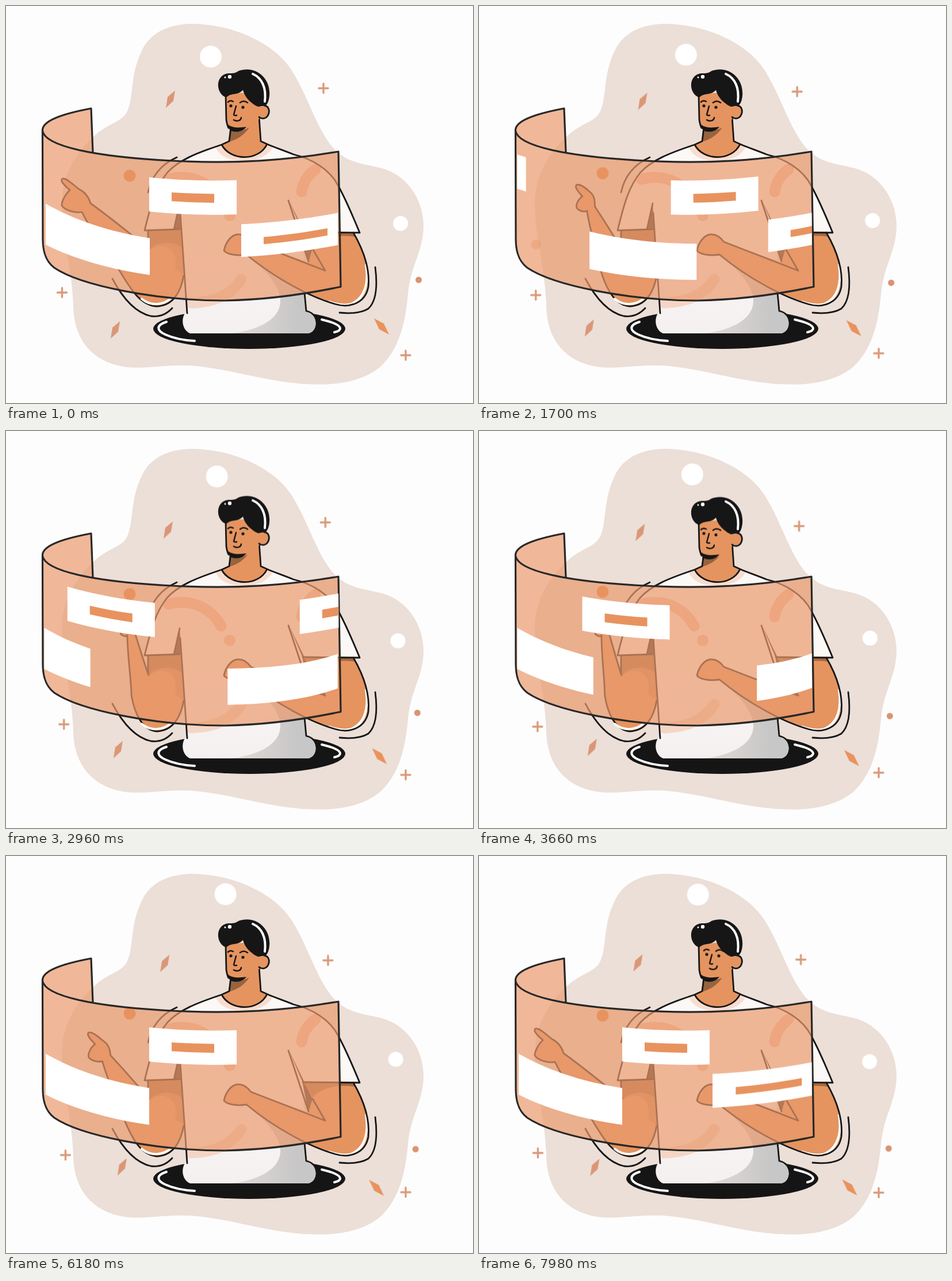
Animation, 812 px wide and 690 px high, one loop 8000 ms. Source, as an HTML page without scripts:

```html
<!DOCTYPE html>
<html lang="en">
<head>
<meta charset="utf-8">
<title>Curved screen</title>
<style>
html, body { margin: 0; width: 100%; height: 100%; overflow: hidden; background: #fdfdfd; }
svg { display: block; width: 100vw; height: 100vh; }
.ln { fill: none; stroke: #161616; stroke-width: 2.8; stroke-linecap: round; stroke-linejoin: round; }
.fine { stroke-width: 2.5; }
.edge { fill: none; stroke: #282828; stroke-width: 3.2; stroke-linejoin: round; }
.shine { fill: none; stroke: #fff; stroke-width: 4; stroke-linecap: round; }
.tint { fill: none; stroke: #f6c3a9; stroke-width: 19; stroke-linecap: round; }
.skin { fill: #e5945f; }
.shade { fill: #a8683a; }
.plus { fill: none; stroke: #da9a7b; stroke-width: 3.4; stroke-linecap: round; }

/* floating bits: --x and --y give the travel */
.slow, .fast { animation: slow 8s infinite; }
.fast { animation-name: fast; }
@keyframes slow {
  0% { transform: none; animation-timing-function: cubic-bezier(.37, 0, .63, 1); }
  84% { transform: translate(var(--x), var(--y)); animation-timing-function: ease-in; }
  100% { transform: translate(calc(var(--x) * .95), calc(var(--y) * .95)); }
}
@keyframes fast {
  0% { transform: none; animation-timing-function: cubic-bezier(.37, 0, .63, 1); }
  71% { transform: translate(var(--x), var(--y)); animation-timing-function: cubic-bezier(.4, 0, .8, .8); }
  100% { transform: translate(calc(var(--x) * .82), calc(var(--y) * .82)); }
}

/* windows sliding along the curved bands */
.slide { animation: slide 8s infinite; }
@keyframes slide {
  0% { transform: none; animation-timing-function: cubic-bezier(.45, 0, .39, 1); }
  72%, 100% { transform: translateX(404px); }
}
.away { animation: away 8s infinite; }
@keyframes away {
  0% { transform: none; animation-timing-function: cubic-bezier(.42, 0, .39, 1); }
  72% { transform: translateX(404px); animation-timing-function: step-end; }
  72.1%, 100% { transform: none; }
}
.leave { animation: leave 8s infinite; transform-box: fill-box; transform-origin: 0 0; }
@keyframes leave {
  0% { transform: translateX(0) scaleX(1); animation-timing-function: cubic-bezier(.33, 0, .67, .4); }
  13.75% { transform: translateX(56px) scaleX(1.01); animation-timing-function: cubic-bezier(.33, .24, .67, .6); }
  29.5% { transform: translateX(217px) scaleX(1.055); animation-timing-function: cubic-bezier(.33, .34, .67, .78); }
  45.75% { transform: translateX(414px) scaleX(1.06); animation-timing-function: ease-out; }
  58%, 100% { transform: translateX(530px) scaleX(1.06); }
}
.enter { animation: enter 8s infinite; }
@keyframes enter {
  0% { transform: translateX(-295px); animation-timing-function: cubic-bezier(.44, 0, .39, 1); }
  72%, 100% { transform: none; }
}
.pop { transform-origin: 493px 398px; animation: pop 8s infinite; }
@keyframes pop {
  0%, 71.9% { transform: none; }
  72%, 90% { transform: scale(0); animation-timing-function: cubic-bezier(.2, .6, .4, 1); }
  100% { transform: scale(1.035); }
}

.head { animation: nod 8s infinite ease-in-out; }
@keyframes nod {
  0%, 31%, 57%, 100% { transform: none; }
  42%, 47% { transform: translateY(4.5px); }
}
.face { animation: look 8s infinite ease-in-out; }
@keyframes look {
  0%, 86% { transform: none; }
  96%, 100% { transform: translate(5px, -2.5px); }
}
</style>
</head>
<body>
<svg viewBox="0 0 812 690" preserveAspectRatio="none">
<defs>
  <path id="gem" d="M8-15L5 3L-8 15L-5-4Z"/>
  <path id="plus" class="plus" d="M-8 0H8M0-8V8"/>
  <linearGradient id="fold" gradientUnits="userSpaceOnUse" x1="385" y1="0" x2="505" y2="0">
    <stop offset="0" stop-color="#e3dcd9"/><stop offset="1" stop-color="#c8c7c7"/>
  </linearGradient>
  <linearGradient id="cloth" gradientUnits="userSpaceOnUse" x1="0" y1="400" x2="0" y2="570">
    <stop offset="0" stop-color="#fbf8f6"/><stop offset="1" stop-color="#f4f0f0"/>
  </linearGradient>
  <clipPath id="inside"><path d="M66.5 200H577.5L579.5 500H66.5Z"/></clipPath>
  <clipPath id="cardA"><rect class="slide" x="249" y="240" width="152" height="140"/><rect class="slide" x="-155" y="240" width="152" height="140"/></clipPath>
  <clipPath id="barA"><rect class="slide" x="288" y="240" width="74" height="140"/><rect class="slide" x="-116" y="240" width="74" height="140"/></clipPath>
  <clipPath id="cardB"><rect class="away" x="409" y="330" width="168" height="140"/></clipPath>
  <clipPath id="barB"><rect class="away" x="448" y="330" width="111" height="140"/></clipPath>
  <clipPath id="cardC"><rect class="leave" x="69" y="320" width="181" height="170"/><rect class="enter" x="69" y="320" width="180" height="170"/></clipPath>
</defs>

<rect width="812" height="690" fill="#fdfdfd"/>
<path fill="#ecdfd7" d="M325 31C398 32 468 66 497 112C527 160 540 215 572 250C600 277 630 274 660 284C705 300 727 345 726 385C724 430 704 450 699 500C695 545 686 595 650 628C615 655 570 660 520 657C450 653 390 630 320 625C270 623 240 632 205 627C150 618 119 580 117 525C116 460 97 400 97 345C97 290 125 250 160 220C185 201 205 200 212 180C222 155 216 120 235 80C250 45 285 31 325 31Z"/>

<!-- floating bits -->
<g fill="#fff">
  <circle class="slow" style="--x:26px;--y:-22px" cx="356" cy="88" r="19"/>
  <circle class="fast" style="--x:-8.5px;--y:-25px" cx="686" cy="378" r="13"/>
</g>
<circle class="slow" style="--x:-5.5px;--y:34px" cx="717.5" cy="476" r="5.5" fill="#d99373"/>
<g class="slow" style="--x:8px;--y:39px"><use href="#plus" x="552" y="143"/></g>
<g class="slow" style="--x:0px;--y:-23px"><use href="#plus" x="695" y="607"/></g>
<g class="fast" style="--x:6px;--y:22px"><use href="#plus" x="97.5" y="498"/></g>
<g fill="#da9777">
  <g class="slow" style="--x:-10px;--y:25px"><use href="#gem" x="286" y="162"/></g>
  <g class="slow" style="--x:12px;--y:-23px"><use href="#gem" x="190" y="563"/></g>
</g>
<g class="slow" style="--x:-9px;--y:20px"><path fill="#e8935f" d="M640 543L657 552L666 571L649 562Z"/></g>

<!-- stand -->
<ellipse cx="423" cy="561" rx="167" ry="35" fill="#151515"/>
<path class="shine" d="M279 549C260 555 262 564 277 571C290 577 308 581 328 582M549 545C566 549 580 554 581 560C581 564 576 566 571 567"/>

<!-- neck and shirt -->
<path class="skin" d="M390 205L387 236L375 241C384 269 442 270 454 240L443 235L440 188Z"/>
<path fill="#96643f" d="M389 214C400 218 412 216 423 211C415 224 402 232 388 236Z"/>
<path fill="url(#cloth)" d="M375 241C330 256 300 268 280 290C260 315 252 345 241 390L302 388L315 530C304 538 304 562 320 569H525C543 566 544 537 522 530L516 393L615 394C603 365 590 335 578 313C563 283 530 265 500 258C480 250 465 245 454 240C440 270 390 270 375 241Z"/>
<path fill="url(#fold)" d="M388 569C430 566 476 548 477 514C478 490 455 462 425 438L517 470L522 530C544 537 543 566 525 569Z"/>
<g class="tint">
  <path d="M282 301C320 291 355 305 374 339"/>
  <path d="M538 284C523 295 516 308 514 323"/>
  <path d="M409 475C392 502 362 515 322 516" stroke-opacity=".6"/>
</g>
<circle cx="389" cy="364" r="10" fill="#f6c3a9"/>
<path fill="#f8ddcf" d="M375 241L365 245C374 277 450 278 464 244L454 240C442 270 388 270 375 241Z"/>
<path fill="#3f2a20" d="M302 343L292 389H305ZM493 340L501 356L533 422L526 446L515 392Z"/>

<!-- left arm -->
<path fill="#cd8350" d="M247 389H304L310 470C300 505 280 521 262 520L245 450Z"/>
<path class="shade" d="M247 390H304L306 420C290 408 265 408 248 424Z"/>
<path class="ln" d="M247 391V425"/>
<path class="skin" stroke="#161616" stroke-width="2.8" stroke-linejoin="round" d="M250 422C235 412 180 366 147 343C143 330 135 322 128 319C118 312 105 298 98 300C94 303 98 309 111 320C104 326 96 340 97 347C103 356 122 360 132 358C150 395 180 435 196 458C212 483 230 520 262 522C290 521 304 498 309 468">
  <animate attributeName="d" dur="8s" repeatCount="indefinite" calcMode="spline" keyTimes="0;.4125;1" keySplines=".28 .5 .7 .92;.35 0 .75 .9"
    values="M250 422C235 412 180 366 147 343C143 330 135 322 128 319C118 312 105 298 98 300C94 303 98 309 111 320C104 326 96 340 97 347C103 356 122 360 132 358C150 395 180 435 196 458C212 483 230 520 262 522C290 521 304 498 309 468;M248 425C241 404 233 373 227 351C230 336 227 328 222 324C216 317 209 314 203 316C200 321 206 327 212 336C203 342 200 352 206 355C211 358 213 357 214 355C214 395 219 429 219 460C224 491 237 520 262 522C290 521 304 498 309 468;M250 422C235 412 180 366 147 343C143 330 135 322 128 319C118 312 105 298 98 300C94 303 98 309 111 320C104 326 96 340 97 347C103 356 122 360 132 358C150 395 180 435 196 458C212 483 230 520 262 522C290 521 304 498 309 468"/>
</path>
<path class="skin" d="M251 424C268 410 293 418 295 440C296 462 290 480 280 496L252 480Z"/>
<path class="shine" d="M236 509C250 521 272 522 288 507"/>

<!-- right arm -->
<path class="skin" d="M522 394H604C622 425 632 455 629 485C624 513 600 524 575 517C530 505 470 475 418 432C400 435 383 431 379 425C382 410 392 398 402 397C412 396 420 402 426 410L526 446L533 422Z"/>
<path class="shade" d="M518 394H604L606 401C580 397 550 401 533 420Z"/>
<path class="shine" d="M626 450C631 482 624 508 600 518C590 521 575 519 562 514"/>
<path class="ln" d="M604 394C622 425 633 457 630 488C625 516 598 526 572 518C530 506 470 475 418 432C400 435 383 431 379 425C382 410 392 398 402 397C412 396 420 402 426 410L555 460L533 422"/>

<!-- shirt lines and motion marks -->
<path class="ln" d="M391 212L388 235L375 241C330 256 300 268 280 290C260 315 252 345 241 390L302 388M302 343L292 388M303 360L315 534M440 192L443 235L454 240C465 245 480 250 500 258C530 265 563 283 578 313C590 335 603 365 615 394L516 393M491 338L526 444M519 498L522 530C527 531 531 533 534 536M375 241C390 270 440 270 454 240"/>
<path class="ln" d="M247 324C253 296 270 275 297 263M185 474C203 508 225 533 252 539C268 541 280 535 289 525M642 454C646 485 645 512 630 526C617 534 600 535 580 533"/>

<!-- head -->
<g class="head">
  <path class="skin" d="M382 152L383 198C384 213 396 219 410 216C425 212 440 203 441 192L445 150Z"/>
  <circle class="skin" cx="447" cy="184" r="10"/>
  <path class="ln" d="M382 154L383 198C384 204 385 209 387 212M449 173C457 174 459 182 456 189C453 196 445 197 440 193"/>
  <path fill="#161616" d="M386 206C393 212 405 212 418 210C413 217 402 221 392 217Q386 214 386 206Z"/>
  <path fill="#161616" d="M383 159C364 153 363 119 387 117C395 117 399 117 404 113C432 102 461 124 458 156C457 166 454 172 450 174C445 173 441 175 438 175C434 173 430 171 427 168C419 162 414 154 412 146C403 156 392 150 383 159Z"/>
  <path class="shine" d="M429 118C445 125 453 142 450 166"/>
  <circle cx="381" cy="124" r="1.5" fill="#fff"/><circle cx="389" cy="123" r="3.2" fill="#fff"/>
  <g class="face">
    <circle cx="391" cy="173.5" r="2.6" fill="#161616"/><circle cx="412" cy="176" r="2.6" fill="#161616"/>
    <path class="ln fine" d="M386 167Q389 163 395 166M407 168Q413 163 420 168M400 174L396 189Q397 191 401 190M396 198C401 201 408 200 409 194"/>
  </g>
</g>

<!-- curved screen -->
<g fill="#ea9b6e" fill-opacity=".7">
  <path d="M63.5 217C62 200 95 188 148 178L151 253C110 246 68 235 63.5 217Z"/>
  <path d="M63.5 217C68 243 150 262 290 269C400 275 490 268 578 253L582 488C510 503 440 511 380 512C260 512 130 486 84 455C68 443 64 425 64 405Z"/>
</g>
<g fill="#e8935f">
  <circle class="fast" style="--x:0px;--y:-21.5px" cx="215" cy="295" r="10.5"/>
  <circle class="fast" style="--x:6px;--y:-22px" cx="98" cy="419" r="8.5" fill-opacity=".4"/>
</g>
<path class="edge" d="M63.5 217C62 200 95 188 148 178L151 254M63.5 217C68 243 150 262 290 269C400 275 490 268 578 253L582 488C510 503 440 511 380 512C260 512 130 486 84 455C68 443 64 425 64 405Z"/>

<!-- cards -->
<g clip-path="url(#inside)" fill="#fff">
  <path clip-path="url(#cardC)" d="M60 338C130 382 240 413 375 413C450 413 530 407 585 384V444C530 467 450 476 375 476C240 476 130 448 60 410Z"/>
  <path clip-path="url(#cardA)" d="M60 256C150 286 230 302 360 303.5C440 303.5 520 294 580 282V341.5C520 353.5 440 363 360 363C230 361.5 150 345.5 60 315.5Z"/>
  <path clip-path="url(#barA)" fill="#e8935f" d="M60 279C150 309 230 325 360 326.5C440 326.5 520 317 580 305V320C520 332 440 341.5 360 342C230 340.5 150 324 60 294Z"/>
</g>
<g clip-path="url(#inside)">
  <g class="pop" fill="#fff">
    <path clip-path="url(#cardB)" d="M360 380.5C440 380.5 520 371 580 359V415C520 427 440 437.5 360 437.5Z"/>
    <path clip-path="url(#barB)" fill="#e8935f" d="M360 405.5C440 405.5 520 395 580 382V394.5C520 407 440 418 360 418Z"/>
  </g>
</g>
</svg>
</body>
</html>
```
